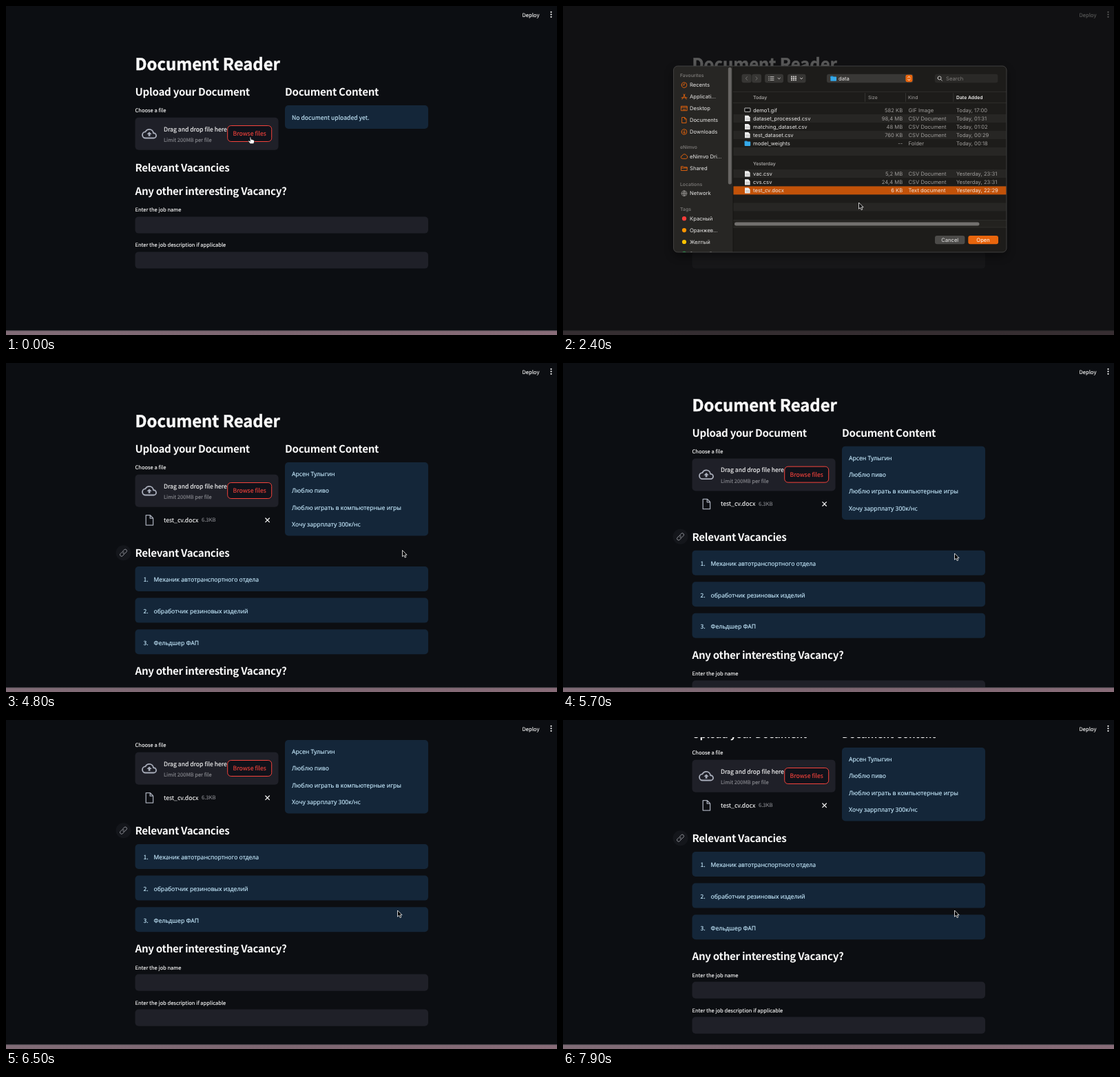
Recreate the animation shown at these times as an HTML page. Size 800 by 477 pixels, loop 8 s.

```html
<!DOCTYPE html>
<html lang="en">
<head>
<meta charset="utf-8">
<title>Document Reader</title>
<style>
html, body { margin: 0; width: 100%; height: 100%; overflow: hidden; background: #0c0e12; }
svg { display: block; width: 800px; height: 477px; }
text { text-rendering: geometricPrecision; white-space: pre; }
.app { font: 400 8.66px "Noto Sans CJK SC", "Noto Sans CJK JP", "Noto Sans CJK KR", "Noto Sans CJK", sans-serif; fill: #fafafa; stroke: #fafafa; stroke-width: .12px; }
.h1 { font-size: 23.85px; font-weight: 700; stroke-width: .45px; }
.h2 { font-size: 15.1px; font-weight: 600; letter-spacing: -.018em; stroke-width: 0; }
.small { font-size: 7.57px; }
.mute { fill: #8b8c92; stroke: #8b8c92; }
.info { fill: #c7ebff; stroke: #c7ebff; }
.red { fill: #f5433c; stroke: #f5433c; }
.ru { font-family: "Noto Sans", "Open Sans", sans-serif; font-size: 8.6px; }
.mac { font: 400 7.65px Inter, "Noto Sans", sans-serif; fill: #e9e8e7; }
.side { font-size: 6.8px; font-weight: 600; fill: #777573; }
.col { font-size: 6.8px; fill: #a5a3a1; }
.dim { fill: #a09e9c; }
.bold { font-weight: 600; }
</style>
</head>
<body>
<svg id="stage" viewBox="0 0 800 477" xmlns="http://www.w3.org/2000/svg">
  <defs>
    <clipPath id="page"><rect y="25" width="800" height="445.5"/></clipPath>
    <clipPath id="sheet"><rect x="160.5" y="87" width="483.5" height="270" rx="6"/></clipPath>
    <linearGradient id="wall"><stop offset="0" stop-color="#816c77"/><stop offset=".5" stop-color="#7d6671"/><stop offset="1" stop-color="#886c78"/></linearGradient>
    <filter id="soft" x="-20%" y="-20%" width="140%" height="140%"><feGaussianBlur stdDeviation="7"/></filter>
  </defs>
</svg>
<script>
const LOOP = 8000, STEP = 100;
const OPEN = 500, PICK = 1500, CLOSE = 3300, FILE = 4000, RESULT = 4300, HOVER = 4600;
const SEC = '#1f2028', BLUE = '#142639', RED = '#f5433c', ORANGE = '#e8650d';
const stage = document.getElementById('stage');

function el(parent, tag, attrs = {}, body) {
  const node = document.createElementNS('http://www.w3.org/2000/svg', tag);
  for (const k in attrs) node.setAttribute(k, attrs[k]);
  if (body !== undefined) node.textContent = body;
  parent.appendChild(node);
  return node;
}
const group = (p, attrs) => el(p, 'g', attrs);
const text = (p, x, y, cls, body, anchor = 'start') =>
  el(p, 'text', { x, y, class: cls, 'text-anchor': anchor }, body);
const box = (p, x, y, width, height, rx, fill, more) =>
  el(p, 'rect', { x, y, width, height, rx, fill, ...more });
const line = (p, d, stroke, width = 1, more) =>
  el(p, 'path', { d, stroke, 'stroke-width': width, fill: 'none', 'stroke-linecap': 'round', 'stroke-linejoin': 'round', ...more });
const dot = (p, cx, cy, r, fill, more) => el(p, 'circle', { cx, cy, r, fill, ...more });
const show = (node, on) => node.setAttribute('visibility', on ? 'inherit' : 'hidden');
const move = (node, x, y) => node.setAttribute('transform', `translate(${x} ${y})`);

// Web page
box(stage, 0, 0, 800, 477, 0, '#0c0e12');
const view = group(stage, { 'clip-path': 'url(#page)' });
const page = group(view);

text(page, 187.5, 93, 'app h1', 'Document Reader');
text(page, 187.5, 130.3, 'app h2', 'Upload your Document');
text(page, 405, 130.3, 'app h2', 'Document Content');
text(page, 187.5, 154.3, 'app small', 'Choose a file');
box(page, 187.5, 161.8, 208, 47, 5, SEC);
const cloud = group(page, { transform: 'translate(197.2 174.3) scale(.906)' });
line(cloud, 'M6 19a5 5 0 0 1-.2-10A7 7 0 0 1 12 5a6.5 6.5 0 0 1 6.5 6H19a4 4 0 0 1 0 8z', '#a9aebb', 2);
el(cloud, 'path', { d: 'M8 13h2.5v3h3v-3H16l-4-4z', fill: '#a9aebb' });
text(page, 229, 181.8, 'app', 'Drag and drop file here');
text(page, 229, 196.9, 'app small mute', 'Limit 200MB per file');
box(page, 321.7, 173.5, 64, 23, 5, '#10121a', { stroke: RED, 'stroke-width': 1 });
text(page, 353.7, 188.2, 'app red', 'Browse files', 'middle');

const content = box(page, 405, 144, 208, 34, 5, BLUE);
const empty = text(page, 415, 164.5, 'app info', 'No document uploaded yet.');

const file = group(page);
line(file, 'M203.2 220.7h6.2l4.2 4.2v10.2h-10.4zM209.2 221v4.2h4.2', '#a3a8b4', 1.3);
text(file, 229, 230.6, 'app', 'test_cv.docx');
text(file, 284, 230.4, 'app small mute', '6.3KB');
line(file, 'M376.8 225l5.6 5.6M382.4 225l-5.6 5.6', '#fafafa', 1.2);

const result = group(page);
['Арсен Тулыгин', 'Люблю пиво', 'Люблю играть в компьютерные игры', 'Хочу заррплату 300к/нс']
  .forEach((s, i) => text(result, 415, 164.2 + i * 24.25, 'app info ru', s));
['Механик автотранспортного отдела', 'обработчик резиновых изделий', 'Фельдшер ФАП']
  .forEach((s, i) => {
    const y = 295 + i * 45.6;
    box(result, 187.5, y, 425.5, 36, 5, BLUE);
    text(result, 199.5, y + 22.3, 'app info', `${i + 1}.`);
    text(result, 214.5, y + 22.3, 'app info ru', s);
  });

const vacancies = text(page, 187.5, 239.6, 'app h2', 'Relevant Vacancies');
const link = group(page);
dot(link, 170.5, 275.2, 11, '#14161b');
line(link, 'M169.6 272.8l2-2a2.2 2.2 0 0 1 3.2 3.2l-2 2a2.2 2.2 0 0 1-3 .1M171.4 277.6l-2 2a2.2 2.2 0 0 1-3.2-3.2l2-2a2.2 2.2 0 0 1 3-.1', '#8f9198', 1);

const other = group(page);
text(other, 187.5, 274.3, 'app h2', 'Any other interesting Vacancy?');
[['Enter the job name', 298.4], ['Enter the job description if applicable', 349.4]].forEach(([s, y]) => {
  text(other, 187.5, y, 'app small', s);
  box(other, 187.5, y + 7, 425.5, 24.2, 5, SEC);
});

text(stage, 749.6, 15.5, 'app small', 'Deploy');
[8.8, 12.3, 15.8].forEach(y => dot(stage, 791.5, y, 1.1, '#fafafa'));
box(stage, 0, 471, 800, 6, 0, 'url(#wall)');
box(stage, 0, 470, 800, 1.2, 0, '#454047');

// File dialog
const shade = box(stage, 0, 0, 800, 477, 0, '#141414');
const dialog = group(stage);
box(dialog, 160, 92, 484, 270, 8, '#000', { filter: 'url(#soft)', opacity: .45 });
const sheet = group(dialog, { 'clip-path': 'url(#sheet)' });
box(sheet, 160, 87, 484, 271, 0, '#1d1c1a');
box(sheet, 160, 87, 87, 271, 0, '#272624');
line(sheet, 'M247 87V357', '#131211', .8);

// Sidebar: label, baseline, icon path around its centre
const disc = r => `M${-r} 0a${r} ${r} 0 1 0 ${2 * r} 0a${r} ${r} 0 1 0 ${-2 * r} 0`;
const places = [
  ['Recents', 117.3, disc(3.8) + 'M0-2.2V0H-1.8'],
  ['Applicati…', 134.2, 'M-3 3.6L1-3.6M-1-3.6L3 3.6M-4 1.4H4'],
  ['Desktop', 151.2, 'M-4.2-3.2h8.4v6.4h-8.4zM-4.2-1.4h8.4M-2 1.6h4'],
  ['Documents', 168.2, 'M-3-4h3.6l2.4 2.4v5.6h-6zM.6-4v2.4h2.4'],
  ['Downloads', 185.2, disc(3.8) + 'M0-2V1.8M-1.6.4L0 2L1.6.4'],
  ['eNimvo Dri…', 221.2, 'M-2.6 2.8a2.1 2.1 0 0 1-.2-4.2a3.2 3.2 0 0 1 6-.4a2.4 2.4 0 0 1-.2 4.6z'],
  ['Shared', 238.2, 'M-4.2-2.8h3l1 1h4.4v4.8h-8.4zM-4.2-.6h8.4'],
  ['Network', 274.4, disc(3.8) + 'M-3.8 0h7.6M0-3.8v7.6M0-3.8q-3.4 3.8 0 7.6q3.4-3.8 0-7.6']
];
places.forEach(([s, y, d]) => {
  text(sheet, 184, y, 'mac', s);
  line(sheet, d, s === 'Network' ? '#8f8d8b' : ORANGE, .9, { transform: `translate(176 ${y - 2.7})` });
});
[['Favourites', 103.4], ['eNimvo', 207.4], ['Locations', 260.8], ['Tags', 297]]
  .forEach(([s, y]) => text(sheet, 170, y, 'mac side', s));
[['Красный', '#ff3d3a'], ['Оранжев…', '#ff9500'], ['Желтый', '#ffc400'], ['Зеленый', '#1fa94a']].forEach(([s, c], i) => {
  const y = 308.2 + i * 16.9;
  dot(sheet, 176, y, 3.1, c);
  text(sheet, 184, y + 2.7, 'mac', s);
});
box(sheet, 239.8, 89, 5, 169.5, 2.5, '#686664');

// Toolbar
const folder = (p, x, y) => {
  box(p, x, y - 3.6, 4, 3, .8, '#1d86c9');
  box(p, x, y - 2.6, 8.6, 6.4, .9, '#35a9ea');
};
[[259.5, 14], [274.2, 13.8], [293, 27], [326, 26.5]].forEach(([x, w]) => box(sheet, x, 98.8, w, 12.4, 3, '#373634'));
line(sheet, 'M267.5 102.6l-2.2 2.4l2.2 2.4M280 102.6l2.2 2.4l-2.2 2.4', '#777573', .9);
for (let i = 0; i < 3; i++) {
  line(sheet, `M298.6 ${102.6 + i * 2.4}h.4M301 ${102.6 + i * 2.4}h5`, '#d5d3d1', .9);
  for (let j = 0; j < 3; j++) box(sheet, 331 + j * 2.9, 101.6 + i * 2.5, 2.1, 1.6, .3, '#d5d3d1');
}
line(sheet, 'M312 104.2l1.7 1.7l1.7-1.7M344.4 104.2l1.7 1.7l1.7-1.7', '#d5d3d1', .9);
box(sheet, 383, 98.8, 125.3, 12.4, 3, '#393836');
folder(sheet, 388.4, 105);
text(sheet, 400, 107.8, 'mac', 'data');
box(sheet, 497.4, 99.8, 10, 10.4, 2.4, ORANGE);
line(sheet, 'M500.7 103.8l1.7-1.7l1.7 1.7M500.7 106.2l1.7 1.7l1.7-1.7', '#fff', .9);
box(sheet, 539.8, 98.8, 91.6, 12.4, 3, '#2a2927');
line(sheet, disc(2.5), '#d5d3d1', .9, { transform: 'translate(546.6 104.4)' });
line(sheet, 'M548.5 106.4l1.9 1.9', '#d5d3d1', .9);
text(sheet, 556, 107.8, 'mac', 'Search').style.fill = '#7d7b79';

// File list
line(sheet, 'M247 124.3H644M247 140.4H644', '#373533', .7);
line(sheet, 'M438.5 126.5V138.5M497.5 126.5V138.5M566.8 126.5V138.5', '#403e3c', .7);
text(sheet, 276, 135, 'mac col bold', 'Today');
text(sheet, 443, 135, 'mac col', 'Size');
text(sheet, 501, 135, 'mac col', 'Kind');
text(sheet, 571, 135, 'mac col bold', 'Date Added').style.fill = '#f0efee';
[157, 181, 205, 237, 261.4, 285.4].forEach(y => box(sheet, 247.5, y, 396, 12, 0, '#272624'));
const chosen = box(sheet, 247.5, 261.4, 396, 12, 0, '#c25209');
text(sheet, 276, 231.4, 'mac col bold', 'Yesterday');

const csv = 'CSV Document';
const rows = [
  ['demo1.gif', '582 KB', 'GIF Image', 'Today, 17:00', 150.8],
  ['dataset_processed.csv', '98,4 MB', csv, 'Today, 01:31', 162.8],
  ['matching_dataset.csv', '48 MB', csv, 'Today, 01:02', 174.9],
  ['test_dataset.csv', '760 KB', csv, 'Today, 00:29', 187],
  ['model_weights', '--', 'Folder', 'Today, 00:18', 199.1],
  ['vac.csv', '5,2 MB', csv, 'Yesterday, 23:31', 243.2],
  ['cvs.csv', '24,4 MB', csv, 'Yesterday, 23:31', 255.3],
  ['test_cv.docx', '6 KB', 'Text document', 'Yesterday, 22:29', 267.4]
];
let pickedCells;
rows.forEach(([name, size, kind, date, y]) => {
  const base = y + 2.8;
  if (kind === 'Folder') folder(sheet, 263.6, y);
  else if (kind === 'GIF Image') box(sheet, 263.8, y - 2.8, 8.2, 5.4, .4, '#0a0a0a', { stroke: '#e8e8e8', 'stroke-width': .8 });
  else {
    el(sheet, 'path', { d: `M264 ${y - 4}h5.2l2.4 2.4v5.8h-7.6z`, fill: '#efefef' });
    line(sheet, `M265.5 ${y + .2}h4.4M265.5 ${y + 2}h4.4`, '#9c9c9c', .6);
  }
  text(sheet, 276, base, 'mac', name);
  pickedCells = [
    text(sheet, 493.2, base, 'mac dim', size, 'end'),
    text(sheet, 501.5, base, 'mac dim', kind),
    text(sheet, 571, base, 'mac dim', date)
  ];
});

box(sheet, 247.5, 310.6, 396, 10.4, 0, '#23221f');
line(sheet, 'M247.5 310.6H644M247.5 321H644', '#383634', .6);
box(sheet, 249, 313.6, 355.5, 5, 2.5, '#72706e');
box(sheet, 540, 333, 43.4, 12.2, 3, '#4c4b49');
text(sheet, 561.7, 341.8, 'mac', 'Cancel', 'middle');
const openButton = box(sheet, 588.3, 333, 43.7, 12.2, 3, ORANGE);
text(sheet, 610.1, 341.8, 'mac', 'Open', 'middle').style.fill = '#fff';
box(dialog, 160.5, 87, 483.5, 270, 6, 'none', { stroke: '#4b4a49', 'stroke-width': .8 });

// Pointers, tip at 0,0
const arrow = group(stage);
el(arrow, 'path', { d: 'M0 0V9.2L2.2 7.3L3.7 10.6L5.3 9.9L3.9 6.7H6.6z', fill: '#000', stroke: '#fff', 'stroke-width': .8, 'stroke-linejoin': 'round' });
const hand = group(stage);
el(hand, 'path', {
  d: 'M-1 .6Q-.2-.6.6.6L1 3.6Q2 3 2.7 3.9Q3.7 3.5 4.2 4.4Q5.4 4.2 5.6 5.6Q5.6 7.8 4.4 9.8H-.4L-3.2 6.2Q-3.4 4.8-2 5.1L-.6 6.2z',
  fill: '#fff', stroke: '#111', 'stroke-width': .7, 'stroke-linejoin': 'round'
});

// Motion: [time, values...]
const pointerPath = [
  [0, 355, 190], [900, 355, 190], [1400, 428, 268], [1800, 428, 268], [2400, 429.5, 285],
  [3000, 604.5, 341], [3800, 604.5, 341], [4600, 575.5, 271.5], [5000, 575.5, 271.5], [5500, 568.5, 276], [8000, 568.5, 276]
];
const scrollPath = [[5400, 0], [5600, 12], [6000, 57.5], [6500, 115], [6800, 138], [7100, 145], [7200, 145], [7500, 125], [7900, 104], [8000, 104]];
const fadePath = [[OPEN, 0], [OPEN + 200, 1], [CLOSE, 1], [CLOSE + 300, .05], [CLOSE + 400, .012], [CLOSE + 500, 0]];

function at(path, t) {
  const i = path.findIndex(k => k[0] > t);
  if (i === 0) return path[0].slice(1);
  if (i < 0) return path[path.length - 1].slice(1);
  const a = path[i - 1], b = path[i], u = (t - a[0]) / (b[0] - a[0]);
  return a.slice(1).map((v, j) => v + (b[j + 1] - v) * u);
}

function render(t) {
  const [scroll] = at(scrollPath, t), [fade] = at(fadePath, t), [x, y] = at(pointerPath, t);
  const loaded = t >= FILE, done = t >= RESULT, picked = t >= PICK;
  move(page, 0, -scroll);
  show(file, loaded);
  show(empty, !done);
  show(result, done);
  content.setAttribute('height', done ? 106.5 : 34);
  move(vacancies, 0, loaded ? 41.6 : 0);
  move(other, 0, done ? 178.2 : loaded ? 41.6 : 0);
  show(link, t >= HOVER);

  shade.setAttribute('opacity', fade * .69);
  dialog.setAttribute('opacity', fade);
  show(chosen, picked);
  pickedCells.forEach(c => { c.style.fill = picked ? '#f6e4d8' : ''; });
  openButton.setAttribute('fill', picked ? ORANGE : '#3a3937');

  const pointing = t < OPEN || (t >= CLOSE + 200 && t < FILE);
  show(hand, pointing);
  show(arrow, !pointing);
  move(pointing ? hand : arrow, x, y);
}

const start = performance.now();
function tick() {
  const t = (performance.now() - start) % LOOP;
  render(Math.floor(t / STEP) * STEP);
  requestAnimationFrame(tick);
}
tick();
</script>
</body>
</html>
```
